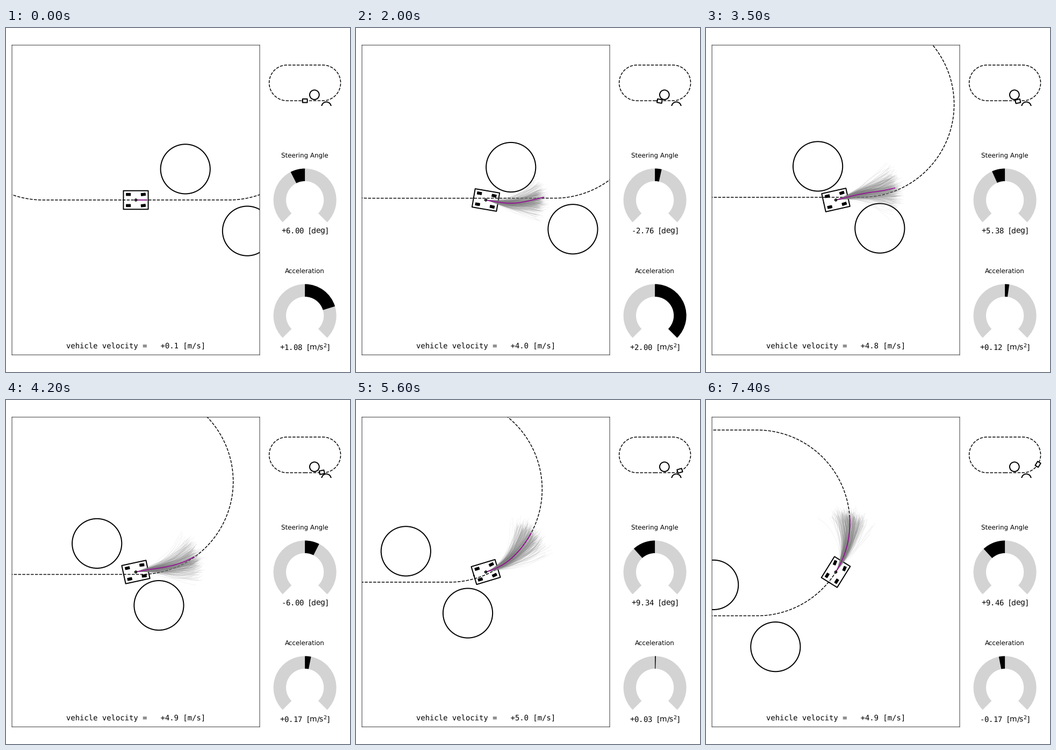
Recreate the animation shown at these times as a matplotlib script. Size 640 by 640 pixels, loop 7.5 s.

```python
import numpy as np
import matplotlib.pyplot as plt
from matplotlib.animation import FuncAnimation
from matplotlib.collections import LineCollection
from matplotlib.patches import Circle, Polygon, Wedge

SIZE, DPI, FRAMES, STEP_MS = 640, 80, 75, 100
K = 8 / 9                      # point scale
WHEEL_BASE, LENGTH, WIDTH = 2.5, 4.0, 3.0
RADIUS = HALF = 15             # oval track
HORIZON, SAMPLES = 20, 500
OBSTACLES = [(8, 5, 4), (18, -5, 4)]
MONO = "DejaVu Sans Mono"

plt.rcParams.update({"font.family": "DejaVu Sans", "path.snap": False,
                     "text.hinting": "none"})


def lag(t):
    return np.exp(-5 * t)


def speed(t):
    """Full throttle after a short lag, then cruising around 4.9 m/s."""
    ramp = 0.14 + 2 * t - 0.184 * (1 - lag(t))
    cruise = 4.885 + 0.16 * np.cos((t - 5.75) * np.pi / 3)
    return np.minimum(ramp, cruise)


def accel_at(t, h=1e-4):
    return (speed(t + h) - speed(t - h)) / (2 * h)


def swerve(s):
    """Offset from the track: smooth steps between its turning points."""
    turns = [(1.2, 0), (8, -0.81), (17, 0.73), (26, 0)]
    e = np.zeros_like(s)
    for (s0, e0), (s1, e1) in zip(turns, turns[1:]):
        u = np.clip((s - s0) / (s1 - s0), 0, 1)
        e += (e1 - e0) * u * u * (3 - 2 * u)
    return e


def drive_path(s):
    """Points, heading and curvature along the driven line."""
    a = np.maximum(s - HALF, 0) / RADIUS
    r = RADIUS - swerve(s)
    pts = np.column_stack([np.minimum(s, HALF) + r * np.sin(a),
                           RADIUS - r * np.cos(a)])
    dx, dy = np.gradient(pts, s, axis=0).T
    yaw = np.unwrap(np.arctan2(dy, dx))
    return pts, yaw, np.gradient(yaw, s) / np.hypot(dx, dy)


TIME = np.arange(0, 10, 0.01)
V = speed(TIME)
DIST = np.concatenate([[0], np.cumsum((V[1:] + V[:-1]) / 2 * 0.01)])
ARC = np.linspace(0, 46, 921)
PTS, YAW, BEND = drive_path(ARC)


def path_at(t):
    """Position, heading and steering angle at time t."""
    s = np.interp(t, TIME, DIST)
    x, y, yaw, bend = (np.interp(s, ARC, c) for c in (*PTS.T, YAW, BEND))
    return np.stack([x, y], axis=-1), yaw, np.arctan(WHEEL_BASE * bend)


def plan(n, t):
    """Best path ahead and the cloud of noisy rollouts around it."""
    span = 2 * (1 - 0.35 * lag(t))
    dt = span / HORIZON
    ahead = t + np.linspace(0, span, HORIZON + 1)
    pts, yaw, steer = path_at(ahead)

    rng = np.random.default_rng(100 + n)
    noise = rng.normal(size=(2, SAMPLES, HORIZON))
    steer = np.clip(steer[:-1] + 0.31 * noise[0], -0.523, 0.523)
    acc = np.clip(accel_at(ahead[:-1]) + 1.41 * noise[1], -2, 2)
    v = np.maximum(speed(t) + np.cumsum(acc, axis=1) * dt, 0)
    head = yaw[0] + np.cumsum(v / WHEEL_BASE * np.tan(steer) * dt, axis=1)
    step = np.stack([np.cos(head), np.sin(head)], axis=2) * (v * dt)[..., None]
    runs = np.concatenate([np.zeros((SAMPLES, 1, 2)), np.cumsum(step, axis=1)],
                          axis=1)
    return pts - pts[0], runs


def place(pts, yaw, shift=(0, 0)):
    c, s = np.cos(yaw), np.sin(yaw)
    return np.asarray(pts) @ np.array([[c, s], [-s, c]]) + shift


def box(length, width):
    return 0.5 * np.array([(-length, 0), (-length, width), (length, width),
                           (length, -width), (-length, -width), (-length, 0)])


def oval():
    a = np.linspace(-np.pi / 2, np.pi / 2, 190)
    arc = np.column_stack([HALF + RADIUS * np.cos(a), RADIUS + RADIUS * np.sin(a)])
    back = np.column_stack([-arc[::-1, 0], arc[::-1, 1]])
    return np.vstack([(0, 0), arc, back, (0, 0)])


def axes_at(cx, cy, w, h, xlim, ylim):
    ax = fig.add_axes([(cx - w/2) / SIZE, 1 - (cy + h/2) / SIZE,
                       w / SIZE, h / SIZE])
    ax.set(xlim=xlim, ylim=ylim, xticks=[], yticks=[])
    return ax


def line(ax, width, **kw):
    return ax.plot([], [], lw=width * K, **{"color": "black", **kw})[0]


def ring(ax, x, y, r, z=0):
    return ax.add_patch(Circle((x, y), r, fc="white", ec="black", lw=2 * K, zorder=z))


class Gauge:
    def __init__(self, cy, title, unit, limit):
        self.unit, self.limit = unit, limit
        ax = axes_at(556.1, cy, 146.27, 146.27, (-1.25, 1.25), (-1.25, 1.25))
        ax.axis("off")
        ax.set_title(title, fontsize=12 * K, pad=6 * K)
        ax.add_patch(Wedge((0, 0), 1, -45, 225, width=0.4, fc="lightgray", lw=0))
        self.hand = ax.add_patch(Wedge((0, 0), 1, 90, 91, width=0.4, fc="black", lw=0))
        self.label = ax.text(0, -1, "", size=14 * K, ha="center", va="center",
                             family=MONO)

    def show(self, value, left):
        sweep = abs(value) / self.limit * 135
        self.hand.set_theta1(90 if left else 90 - sweep)
        self.hand.set_theta2(90 + sweep if left else 90)
        self.label.set_text(f"{value:+.2f} " + r"$ \rm{[%s]}$" % self.unit)


fig = plt.figure(figsize=(SIZE / DPI, SIZE / DPI), dpi=DPI, facecolor="white")
TRACK, BODY, WHEEL = oval(), box(LENGTH, WIDTH), box(0.7, 0.4)

# main view
view = axes_at(241.53, 320, 460.93, 576.17, (-20, 20), (-25, 25))
for side in view.spines.values():
    side.set_linewidth(0.8 * K)
rings = [ring(view, *o) for o in OBSTACLES]
track = line(view, 1.5, ls="dashed")
body = line(view, 2, zorder=3)
wheels = [view.add_patch(Polygon(WHEEL, color="black", lw=K, zorder=3))
          for _ in range(4)]
cloud = view.add_collection(LineCollection([], colors="gray", lw=0.2 * K,
                                           alpha=0.4, zorder=4), autolim=False)
best = line(view, 1.5, color="#990099", zorder=5)
ring(view, 0, 0, WIDTH / 20, 6)
info = view.text(0.5, 0.02, "", ha="center", transform=view.transAxes,
                 fontsize=14 * K, family=MONO)

# mini map
mini = axes_at(556.1, 105, 146.27, 79.3, (-33, 33), (-4.2, 31.6))
mini.axis("off")
for o in OBSTACLES:
    ring(mini, *o)
line(mini, 1.5, ls="dashed").set_data(*TRACK.T)
mini_fill = mini.add_patch(Polygon(BODY, color="white", lw=K, zorder=2))
mini_body = line(mini, 2, zorder=3)

steer_gauge = Gauge(320, "Steering Angle", "deg", 30)
accel_gauge = Gauge(535, "Acceleration", "m/s^2", 2)


def draw(n):
    t = n * STEP_MS / 1000
    pos, yaw, steer = path_at(t)
    steer += np.radians(6) * lag(t)
    accel = accel_at(t)

    for patch, (x, y, _) in zip(rings, OBSTACLES):
        patch.center = (x - pos[0], y - pos[1])
    track.set_data(*(TRACK - pos).T)
    body.set_data(*place(BODY, yaw).T)
    corners = [(sx, sy) for sx in (-0.3, 0.3) for sy in (-0.3, 0.3)]
    for patch, (sx, sy) in zip(wheels, corners):
        wheel = place(WHEEL, steer if sx > 0 else 0, (sx * LENGTH, sy * WIDTH))
        patch.set_xy(place(wheel, yaw))

    ahead, runs = plan(n, t)
    best.set_data(*ahead.T)
    cloud.set_segments(runs)
    info.set_text(f"vehicle velocity = {speed(t):>+6.1f} [m/s]")

    small = place(BODY, yaw, pos)
    mini_fill.set_xy(small)
    mini_body.set_data(*small.T)

    steer_gauge.show(np.degrees(steer), steer >= 0)
    accel_gauge.show(accel, accel < 0)
    return []


anim = FuncAnimation(fig, draw, frames=FRAMES, interval=STEP_MS,
                     repeat=True, repeat_delay=0, blit=False)
plt.show()
```
